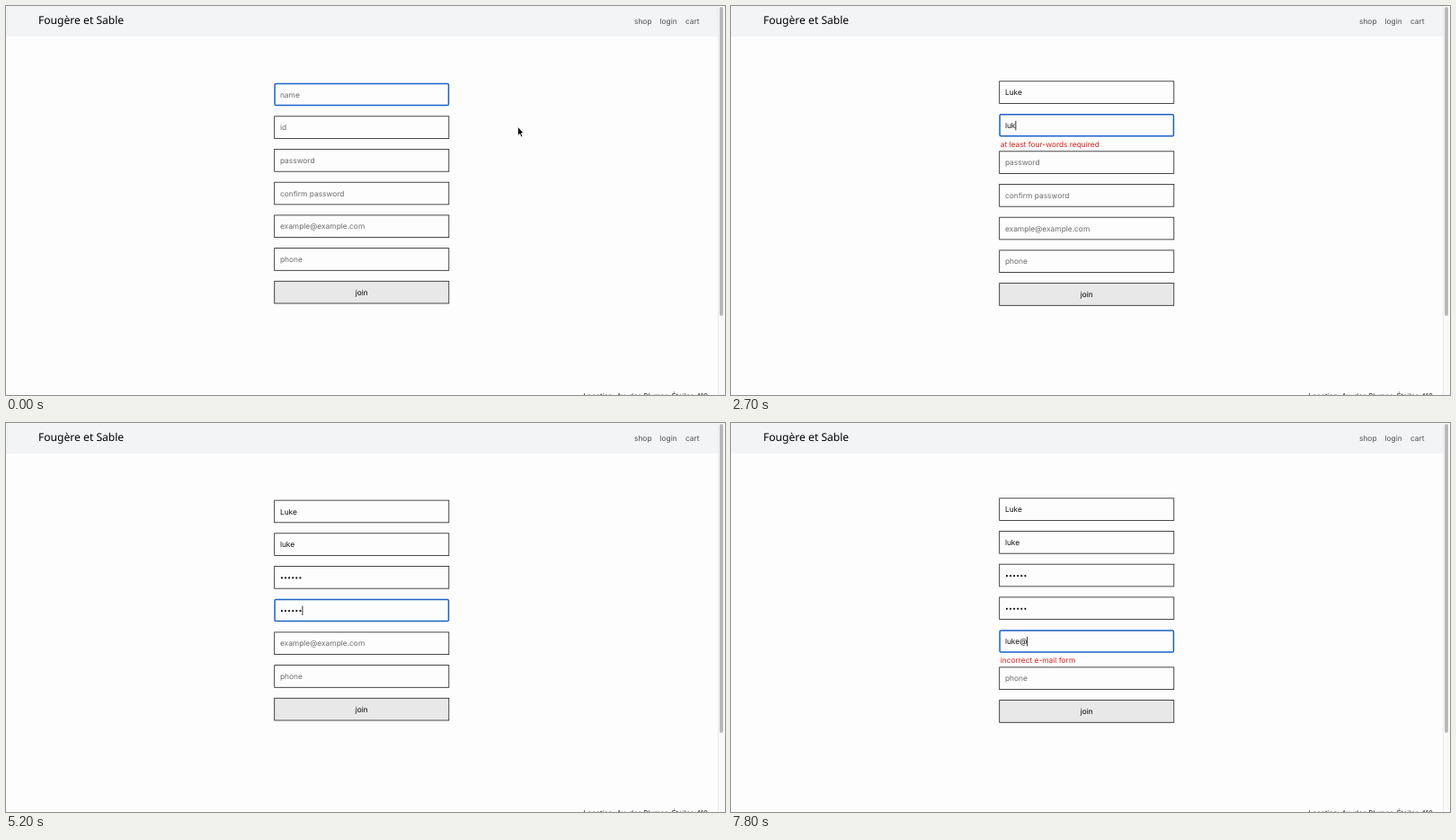
Animation of 800 by 433 pixels, one loop 8 s. Source, as an HTML page:

```html
<!DOCTYPE html>
<html lang="en">
<head>
<meta charset="utf-8">
<title>Join form</title>
<style>
  html, body { margin: 0; width: 100%; height: 100%; overflow: hidden; }
  body {
    position: relative; background: #fdfdfd; color: #111;
    font: 8.4px/10px Inter, "Open Sans", sans-serif;
    text-rendering: geometricPrecision; white-space: pre;
  }
  body > *, nav span { position: absolute; box-sizing: border-box; }
  header { left: 0; top: 0; width: 792px; height: 34px; background: #f3f4f6; }
  h1 { margin: 0; left: 36px; top: 8px; font: 12.1px/16px "Noto Sans", sans-serif; color: #000; }
  h1 b { font-weight: 500; }
  nav { left: 0; top: 13px; color: #505050; }
  #track { left: 792px; top: 0; width: 8px; height: 433px; background: #fafafa; border-left: 1px solid #e9e9e9; }
  #thumb { left: 794px; top: 1px; width: 4px; height: 344px; border-radius: 2px; background: #b9b9b9; }
  footer { right: 19px; top: 429px; font-size: 8px; color: #222; }
  #form { left: 0; top: 0; }
  #form text { fill: #111; }
  #form .hint { fill: #6c6c6c; }
  #form .error { fill: #d9201c; }
  #form .join { text-anchor: middle; fill: #000; }
  .field { fill: none; stroke: #1c1c1c; stroke-width: .8; }
  .focus { stroke: #1a62c8; stroke-width: 1.5; }
  .button { fill: #e9e8e9; }
  #popup {
    left: 354px; top: 263px; width: 113px; height: 25px; padding-left: 7px;
    border-radius: 4px; background: #fcf9fc; box-shadow: 0 1px 3px #0005;
    font-size: 7.2px; font-weight: 600; line-height: 25px;
  }
  #mouse { left: 567.5px; top: 133px; }
</style>
</head>
<body>
<header></header>
<h1>Foug<b>è</b>re et Sable</h1>
<nav><span style="left:699px">shop</span><span style="left:727.5px">login</span><span style="left:756px">cart</span></nav>
<div id="track"></div><div id="thumb"></div>
<footer>Location: Av. des Plumes-Étoiles 418</footer>
<svg id="form" width="792" height="433"></svg>
<div id="popup">tkrnbvf2@example.com</div>
<svg id="mouse" width="10" height="16"><path d="M1.5 1.5V11.2L3.7 9.2L5.2 12.8L6.8 12.1L5.3 8.6H8Z" fill="#000" stroke="#fff" stroke-width=".7"/></svg>
<script>
const LOOP = 8000;
const LEFT = 298.3, WIDTH = 194.9, HEIGHT = 25.5, TEXT_LEFT = 304.9;
const FIRST_ROW = 98.45, PITCH = 36.7, ERROR_SHIFT = 2.3;   // row centres
const BASELINE = 3.1, ERROR_BASELINE = 24;
const fields = ['name', 'id', 'password', 'confirm', 'email', 'phone'];
const hints = { confirm: 'confirm password', email: 'example@example.com' };
const messages = {
  name: 'at least two-words required',
  id: 'at least four-words required',
  password: 'at least six-words required',
  confirm: 'incorrect password',
  email: 'incorrect e-mail form'
};
const secret = new Set(['password', 'confirm']);
const start = { focus: 'name', errors: [], caret: false, popup: false, mouse: true };

// Each entry changes only the listed parts of the state.
const events = [
  [0, {}],
  [500, { name: 'L', mouse: false, caret: true }],
  [600, { errors: ['name'] }],
  [700, { name: 'Lu' }],
  [800, { errors: [] }],
  [900, { name: 'Luk' }],
  [1000, { name: 'Luke' }],
  [1400, { caret: false }],
  [1600, { focus: 'id', caret: true }],
  [2100, { caret: false }],
  [2300, { id: 'l', caret: true }],
  [2400, { errors: ['id'] }],
  [2500, { id: 'lu' }],
  [2700, { id: 'luk' }],
  [2900, { id: 'luke' }],
  [3000, { errors: [] }],
  [3300, { focus: 'password' }],
  [3600, { password: '1' }],
  [3700, { password: '12', errors: ['password', 'confirm'] }],
  [3800, { password: '123' }],
  [4000, { password: '1234' }],
  [4100, { password: '12345' }],
  [4200, { password: '123456' }],
  [4300, { errors: ['confirm'] }],
  [4400, { focus: 'confirm' }],
  [4500, { confirm: '1' }],
  [4600, { confirm: '12' }],
  [4700, { confirm: '123' }],
  [4800, { confirm: '1234' }],
  [5000, { confirm: '12345' }],
  [5100, { confirm: '123456' }],
  [5200, { errors: [] }],
  [5600, { focus: 'email' }],
  [6000, { email: 't', errors: ['email'] }],
  [6100, { popup: true }],
  [6500, { email: '', popup: false }],
  [6600, { errors: [] }],
  [6900, { email: 'l' }],
  [7000, { errors: ['email'] }],
  [7200, { email: 'lu' }],
  [7400, { email: 'luk' }],
  [7600, { email: 'luke' }],
  [7800, { email: 'luke@' }]
];

const byId = id => document.getElementById(id);
const form = byId('form');

function add(tag, attributes, content = '') {
  const node = document.createElementNS('http://www.w3.org/2000/svg', tag);
  for (const name in attributes) node.setAttribute(name, attributes[name]);
  node.textContent = content;
  form.append(node);
  return node;
}

const addText = (cls, x, y, content) => add('text', { class: cls, x, y }, content);

function addBox(cls, middle, line, rx) {
  add('rect', {
    class: cls, rx, x: LEFT + line / 2, y: middle - HEIGHT / 2 + line / 2,
    width: WIDTH - line, height: HEIGHT - line
  });
}

// Draws what a field holds and returns the width of the typed part.
function addValue(key, value, middle) {
  if (secret.has(key) && value) {
    for (let i = 0; i < value.length; i++) {
      add('circle', { cx: TEXT_LEFT + 2 + i * 4.1, cy: middle + .6, r: 1.1, fill: '#111' });
    }
    return value.length * 4.1;
  }
  const text = addText(value ? '' : 'hint', TEXT_LEFT, middle + BASELINE, value || hints[key] || key);
  return value ? text.getComputedTextLength() : 0;
}

function render(state) {
  form.replaceChildren();
  let shift = -ERROR_SHIFT * state.errors.length;
  const rowMiddle = i => FIRST_ROW + i * PITCH + shift;
  fields.forEach((key, i) => {
    const middle = rowMiddle(i), focused = state.focus === key;
    if (focused) addBox('field focus', middle, 1.5, 1.3);
    else addBox('field', middle, .8, 0);
    const typed = addValue(key, state[key] || '', middle);
    if (focused && state.caret) {
      add('rect', { x: TEXT_LEFT + typed, y: middle - 5, width: .8, height: 10.5 });
    }
    if (state.errors.includes(key)) {
      addText('error', 299.7, middle + ERROR_BASELINE, messages[key]);
      shift += 2 * ERROR_SHIFT;
    }
  });
  const last = rowMiddle(fields.length);
  addBox('field button', last, .8, 0);
  addText('join', LEFT + WIDTH / 2, last + BASELINE, 'join');
  byId('popup').style.display = state.popup ? 'block' : 'none';
  byId('mouse').style.display = state.mouse ? 'block' : 'none';
}

let shownCount = 0;
function tick() {
  const time = performance.now() % LOOP;
  const past = events.filter(([at]) => at <= time);
  if (past.length !== shownCount) {
    shownCount = past.length;
    render(Object.assign({}, start, ...past.map(([, change]) => change)));
  }
  requestAnimationFrame(tick);
}
tick();
</script>
</body>
</html>
```
